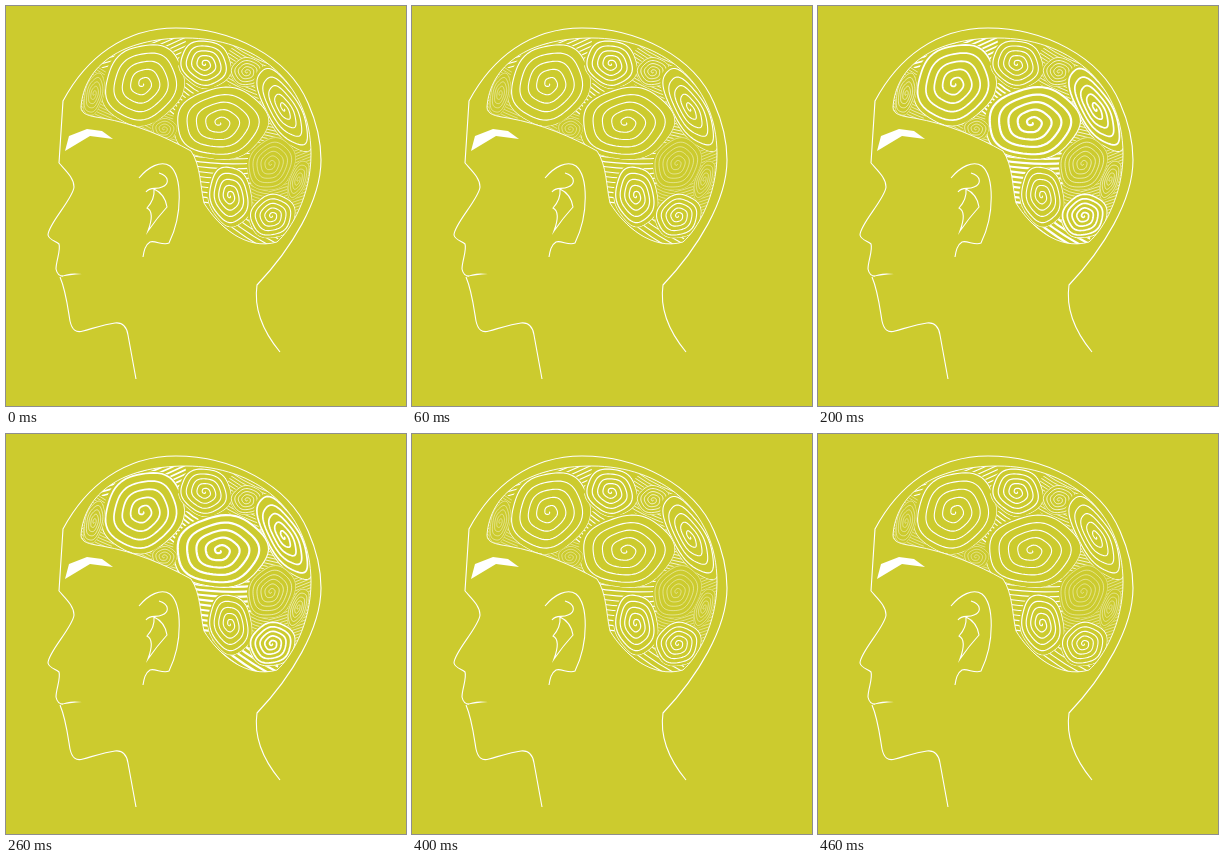
These frames come from a looping animation (400 by 400 pixels, 500 ms). An HTML page with a canvas:

```html
<!DOCTYPE html>
<html lang="en">
<head>
<meta charset="utf-8">
<title>Thinking head</title>
<style>
html, body { margin: 0; height: 100%; overflow: hidden; background: #cccb2e; }
canvas { display: block; }
</style>
</head>
<body>
<canvas width="400" height="400"></canvas>
<script>
const ctx = document.querySelector('canvas').getContext('2d');
const GREEN = '#cccb2e';
const TAU = Math.PI * 2;
const BEAT = 100;
const BEATS = 5;

// Line weight at the start, a quarter and the middle of the pulse.
const BOLD = [1.1, 0.8, 2.2];
const FIRM = [1.1, 0.8, 1.7];
const COUNTER = [1.2, 2, 1.1];
const FAINT = [0.45, 1, 0.6];
const SOFT = [0.8, 0.5, 0.8];

const outline = new Path2D(`
  M53,157 L57,95 C80,52 118,22 170,22 C225,22 282,50 302,97
  C310,115 315,135 315,154 C315,195 285,243 251,279 C247,307 260,329 274,346
  M53,157 C60,165 68,172 68,181 C67,193 42,218 42,229 C43,234 50,235 53,238
  C55,244 50,255 50,263 C51,268 54,270 57,270
  M54,271 C60,285 62,303 64,315 C66,324 70,327 77,325
  C88,322 100,318 109,317 C117,316 121,322 122,329 L130,373`);
const ear = new Path2D(`
  M133,172 C142,161 155,154 164,160 C176,170 177,208 163,237
  C157,240 149,234 144,236 C139,239 138,245 137,251
  M153,167 C163,170 164,178 156,181 C150,184 144,180 140,186
  M148,183 Q149,193 141,202 Q149,206 142,225 Q151,212 161,201 Q159,188 148,183`);
const browAndMouth = new Path2D(
  'M59,145 L63,130 81,123 96,125 107,133 84,130Z M54,271 Q62,266 76,268 Q63,269 54,271Z');
const brain = new Path2D(`
  M75,101 C78,60 115,32 180,32 C248,32 305,75 305,148 C305,190 285,224 271,236
  C240,245 212,220 198,197 C194,180 195,160 185,145
  C160,131 130,118 96,112 C82,110 75,108 75,101Z`);

const layers = [];

// A round patch of gently bowed parallel lines.
function hatch(x, y, radius, degrees, step, weights) {
  const area = new Path2D();
  area.arc(x, y, radius, 0, TAU);
  const lines = new Path2D();
  const turn = new DOMMatrix().translate(x, y).rotate(degrees);
  for (let d = -radius; d < radius; d += step) {
    lines.addPath(new Path2D(`M${-radius},${d} Q0,${d + 5} ${radius},${d}`), turn);
  }
  layers.push({ area, lines, weights });
}

// A tilted, slightly five-cornered oval wound from its centre to its rim.
function spiral(x, y, rx, ry, degrees, turns, weights) {
  const tilt = degrees * TAU / 360;
  const wind = (from, to) => {
    const path = new Path2D();
    for (let a = from; a <= to; a += TAU / 60) {
      const r = Math.min(1, a / turns / TAU) * (1 + 0.025 * Math.cos(5 * a + x));
      const u = rx * r * Math.cos(a - tilt);
      const v = ry * r * Math.sin(a - tilt);
      path.lineTo(x + u * Math.cos(tilt) - v * Math.sin(tilt),
                  y + u * Math.sin(tilt) + v * Math.cos(tilt));
    }
    return path;
  };
  const full = turns * TAU;
  layers.push({ area: wind(full, full + TAU), lines: wind(0, full + TAU / 2), weights });
}

hatch(295, 185, 42, -20, 2.8, FAINT);
hatch(264, 108, 32, 15, 3, SOFT);
hatch(245, 62, 28, 25, 3, SOFT);
hatch(135, 40, 45, -20, 4, FIRM);
hatch(86, 90, 30, 30, 2.8, FAINT);
hatch(158, 123, 26, 20, 2.8, FAINT);
hatch(178, 95, 18, 35, 4, FIRM);
hatch(238, 222, 36, 35, 5, BOLD);
hatch(213, 166, 36, 3, 5, BOLD);
hatch(250, 190, 13, 20, 3, FAINT);

spiral(137, 78, 44, 39, -45, 5, FIRM);
spiral(199, 58, 27, 24, 25, 5, COUNTER);
spiral(241, 66, 17, 15, 0, 5, SOFT);
spiral(278, 103, 48, 19, 60, 5, FIRM);
spiral(214, 117, 48, 37, -5, 5, BOLD);
spiral(265, 158, 28, 23, -60, 6, FAINT);
spiral(224, 190, 31, 22, 80, 5, COUNTER);
spiral(266, 210, 24, 22, -30, 5, FIRM);
spiral(292, 174, 21, 9, -70, 5, FAINT);
spiral(88, 88, 22, 10, -76, 5, FAINT);
spiral(158, 123, 13, 11, 0, 4, FAINT);

function stroke(path, width) {
  ctx.lineWidth = width;
  ctx.stroke(path);
}

function draw(now) {
  const beat = Math.floor(now / BEAT) % BEATS;
  const level = Math.min(beat, BEATS - 1 - beat);
  ctx.strokeStyle = 'white';
  ctx.fillStyle = GREEN;
  ctx.fillRect(0, 0, 400, 400);

  ctx.save();
  ctx.clip(brain);
  for (const { area, lines, weights } of layers) {
    ctx.fill(area);
    ctx.save();
    ctx.clip(area);
    stroke(lines, weights[level]);
    ctx.restore();
  }
  ctx.restore();

  stroke(brain, 0.9);
  stroke(outline, 1.1);
  stroke(ear, 1.1);
  ctx.fillStyle = 'white';
  ctx.fill(browAndMouth);
  requestAnimationFrame(draw);
}

draw(performance.now());
</script>
</body>
</html>
```
